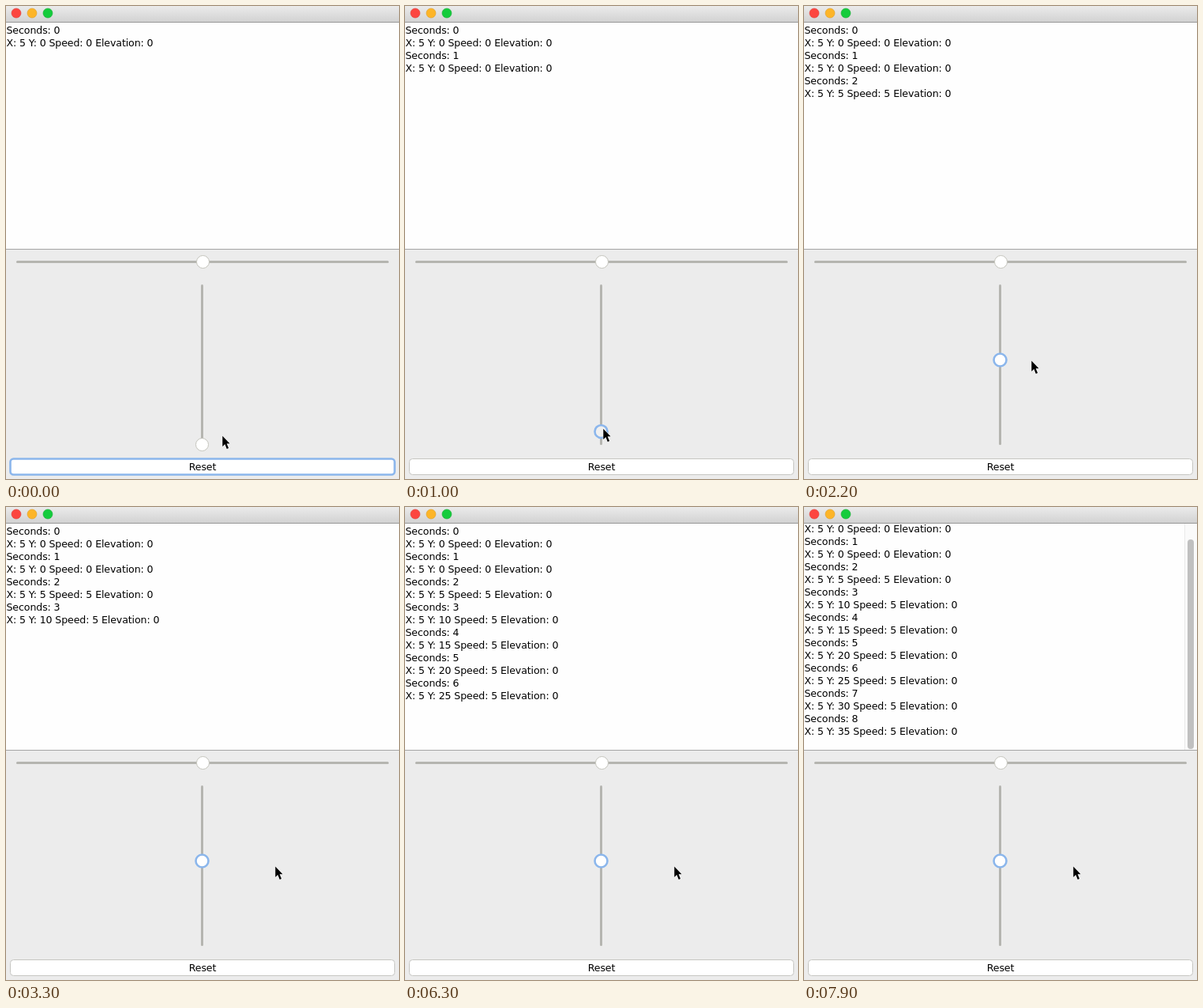
These frames come from a looping animation (498x598 px, 8000 ms). An HTML page:

```html
<!DOCTYPE html>
<html lang="en">
<head>
<meta charset="utf-8">
<title>Slider log</title>
<style>
  html, body { margin: 0; width: 100%; height: 100%; overflow: hidden; background: #ececec; }
  svg { display: block; width: 498px; height: 598px; }
  text { font: 12.6px "DejaVu Sans", sans-serif; letter-spacing: -.12px; fill: #000; white-space: pre; }
  .track { stroke: #b5b5b0; stroke-width: 3; stroke-linecap: round; }
  .knob { fill: #fff; stroke: #c4c4bc; stroke-width: 1; }
</style>
</head>
<body>
<svg viewBox="0 0 498 598">
  <defs>
    <linearGradient id="bar" x2="0" y2="1">
      <stop offset="0" stop-color="#ebebeb"/>
      <stop offset="1" stop-color="#d2d2d2"/>
    </linearGradient>
    <clipPath id="view"><rect y="21" width="498" height="286"/></clipPath>
  </defs>
  <rect width="498" height="598" fill="#ececec"/>

  <rect width="498" height="20" fill="url(#bar)"/>
  <rect y="20" width="498" height="1" fill="#979797"/>
  <circle cx="13" cy="9" r="6" fill="#fc4640" stroke="#de3e38" stroke-width=".6"/>
  <circle cx="33" cy="9" r="6" fill="#fdb528" stroke="#dc9c28" stroke-width=".6"/>
  <circle cx="53" cy="9" r="6" fill="#14cc3c" stroke="#18ac34" stroke-width=".6"/>

  <rect y="21" width="498" height="286" fill="#fefefe"/>
  <g clip-path="url(#view)"><g id="log"></g></g>
  <g id="scroll" visibility="hidden">
    <rect x="482" y="21" width="16" height="286" fill="#fafafa"/>
    <rect x="482" y="21" width="1" height="286" fill="#e9e9e9"/>
    <rect x="486" y="41" width="8" height="265" rx="4" fill="#c0c0c0"/>
  </g>
  <rect y="307" width="498" height="1" fill="#a5a5a5"/>

  <path class="track" d="M14.5 323.5H483.5"/>
  <circle class="knob" cx="249.5" cy="323.5" r="8"/>
  <path class="track" d="M248.5 353.5V553.5"/>
  <circle id="knob" class="knob" cx="248.5" r="8"/>

  <rect id="button" x="5.5" y="572.5" width="487" height="20" rx="4" fill="#fff"/>
  <text x="249" y="587" text-anchor="middle">Reset</text>

  <path id="cursor" d="M.3 .5V14L3.4 11.1L5.8 17L8.1 16L5.7 10.3H9.6Z"
        fill="#000" stroke="#fff" stroke-width="1" stroke-linejoin="round" paint-order="stroke"/>
</svg>
<script>
const LOOP = 8000, STEP = 100, ROW = 16, VIEW = 285, SECONDS = 9;
const PRESS = 500, RELEASE = 1800;

// [time, x, y]
const pointer = [
  [0, 274, 543], [500, 251, 551], [800, 251, 551],
  [1600, 250, 444], [1800, 250, 443], [2700, 341, 454]
];
const thumb = [[0, 554.5], [800, 554.5], [1600, 448.5], [1800, 447.5]];

const $ = id => document.getElementById(id);
const set = (el, attrs) => {
  for (const key in attrs) el.setAttribute(key, attrs[key]);
};

function at(keys, t, i) {
  const n = keys.findIndex(k => k[0] > t);
  if (n < 0) return keys[keys.length - 1][i];
  const a = keys[n - 1], b = keys[n];
  let p = (t - a[0]) / (b[0] - a[0]);
  p = p * p * (3 - 2 * p);
  return a[i] + (b[i] - a[i]) * p;
}

const rows = [];
function addRow(content) {
  const row = document.createElementNS("http://www.w3.org/2000/svg", "text");
  set(row, { x: 0.5, y: 35 + rows.length * ROW });
  row.textContent = content;
  $("log").append(row);
  rows.push(row);
}
for (let s = 0; s < SECONDS; s++) {
  addRow(`Seconds: ${s}`);
  addRow(`X: 5 Y: ${Math.max(0, s - 1) * 5} Speed: ${s > 1 ? 5 : 0} Elevation: 0`);
}

function draw(t) {
  const count = 2 * (1 + Math.floor((t + 200) / 1000));
  rows.forEach((row, i) => set(row, { visibility: i < count ? "visible" : "hidden" }));
  const offset = Math.max(0, (count + 1) * ROW - VIEW);
  set($("log"), { transform: `translate(0 ${-offset})` });
  set($("scroll"), { visibility: offset ? "visible" : "hidden" });

  const focused = t >= PRESS, pressed = focused && t < RELEASE;
  $("knob").style.cssText = focused
    ? `stroke:#8bb6ec;stroke-width:2.6;fill:${pressed ? "#f0f0f0" : "#fff"}` : "";
  set($("knob"), { cy: at(thumb, t, 1) });
  set($("button"), focused
    ? { stroke: "#c6c6c2", "stroke-width": 1 }
    : { stroke: "#8bb6ec", "stroke-width": 2.6 });

  const x = Math.round(at(pointer, t, 1)), y = Math.round(at(pointer, t, 2));
  set($("cursor"), { transform: `translate(${x} ${y})` });
}

const start = performance.now();
function tick() {
  const t = (performance.now() - start) % LOOP;
  draw(Math.floor(t / STEP) * STEP);
  requestAnimationFrame(tick);
}
draw(0);
requestAnimationFrame(tick);
</script>
</body>
</html>
```
